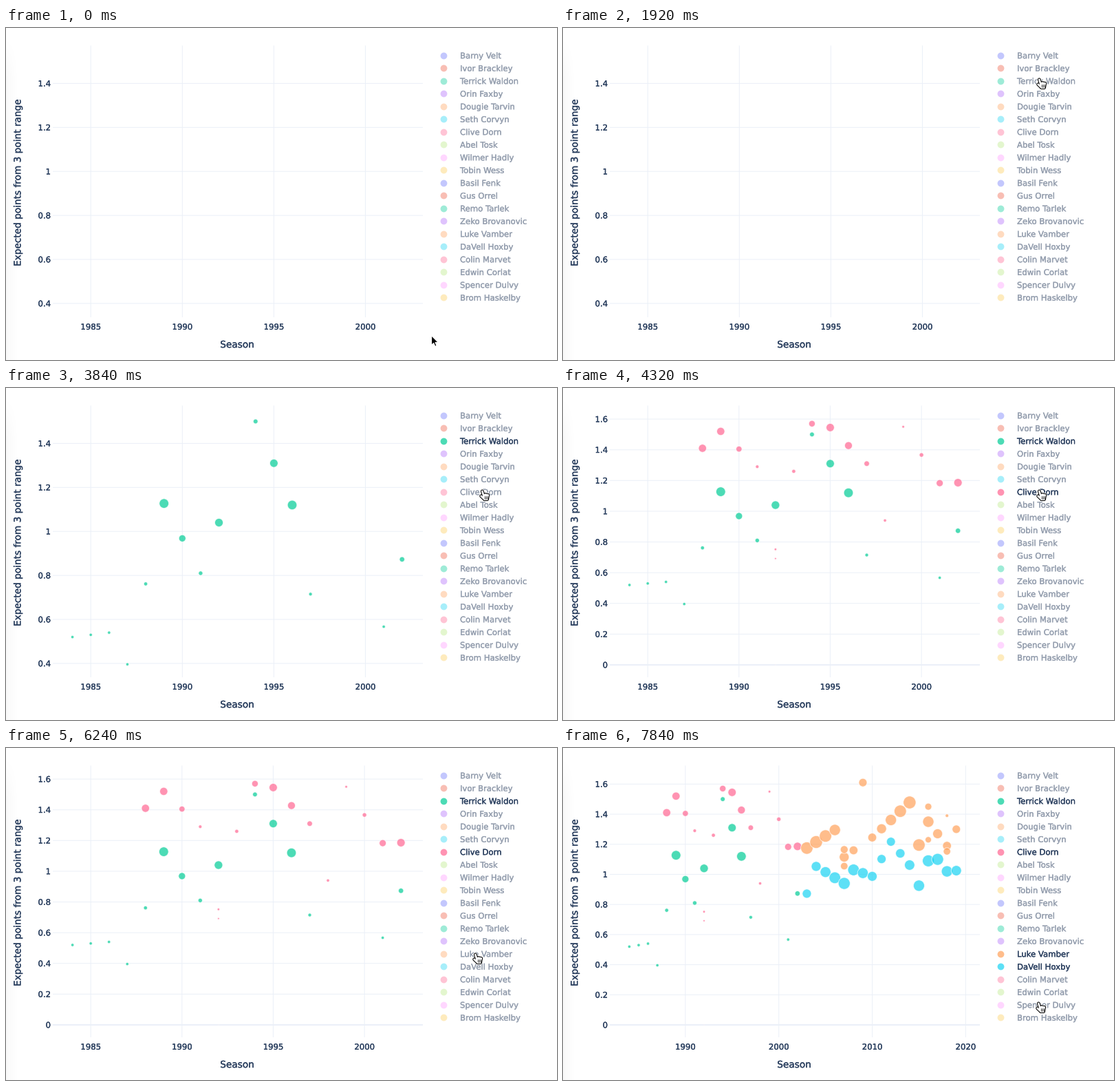
These frames come from a looping animation (801 px wide and 482 px high, 8 s). A matplotlib script:

```python
import math

import matplotlib.pyplot as plt
import numpy as np
from matplotlib.animation import FuncAnimation
from matplotlib.colors import to_rgba
from matplotlib.patches import Polygon
from matplotlib.patheffects import withStroke

W, H, DPI = 801, 482, 100
PT = 72 / DPI                      # points per pixel
FRAMES, STEP = 50, 160
INK, GRID = "#2a3f5f", "#ebf0f8"
LEFT, RIGHT, TOP, BOTTOM = 68, 606, 25.5, 420

plt.rcParams.update({"font.family": "DejaVu Sans", "text.hinting": "none",
                     "toolbar": "None"})

COLORS = ["#636efa", "#ef553b", "#00cc96", "#ab63fa", "#ffa15a",
          "#19d3f3", "#ff6692", "#b6e880", "#ff97ff", "#fecb52"]
PLAYERS = ["Barny Velt", "Ivor Brackley", "Terrick Waldon", "Orin Faxby",
           "Dougie Tarvin", "Seth Corvyn", "Clive Dorn", "Abel Tosk",
           "Wilmer Hadly", "Tobin Wess", "Basil Fenk", "Gus Orrel",
           "Remo Tarlek", "Zeko Brovanovic", "Luke Vamber", "DaVell Hoxby",
           "Colin Marvet", "Edwin Corlat", "Spencer Dulvy", "Brom Haskelby"]


def wave(mean, swing, peak, period):
    """Dot radius that rises and falls over the seasons."""
    return lambda year, _: mean + swing * np.cos(math.tau * (year - peak) / period)


def bump(base, gain, middle, spread):
    """Dot radius that is largest for values near the middle."""
    return lambda _, value: base + gain * np.exp(-((value - middle) / spread) ** 2)


class Series:
    """Seasons along a line through turning points; a season split between
    teams gets further, smaller dots at an offset from the line."""

    def __init__(self, row, shown, radius, turns, gaps=(), splits=()):
        self.row, self.shown = row, shown
        at, level = zip(*turns)
        years = np.array([y for y in range(at[0], at[-1] + 1) if y not in gaps])
        extra = np.array([y for y, _ in splits], int)
        shift = np.array([0] * len(years) + [d for _, d in splits])
        self.years = np.append(years, extra)
        line = np.interp(self.years, at, level)
        self.values = line + shift
        self.radii = radius(self.years, line) * np.exp(-5 * np.abs(shift))


SERIES = [
    Series(2, 2240, bump(2, 4.8, 1.17, .28),
           [(1984, .52), (1986, .54), (1987, .396), (1989, 1.127),
            (1991, .81), (1994, 1.5), (1996, 1.12), (1997, .715),
            (2001, .567), (2002, .873)],
           gaps=(1993, 1998, 1999, 2000)),
    Series(6, 4160, wave(3.7, 2.1, 1995.3, 6.8),
           [(1988, 1.41), (1989, 1.52), (1991, 1.29), (1992, .752),
            (1993, 1.26), (1994, 1.57), (1995, 1.545), (1997, 1.31),
            (1998, .94), (1999, 1.55), (2001, 1.183), (2002, 1.186)],
           splits=[(1992, -.06), (1992, -.752)]),
    Series(14, 6560, wave(7.4, 1.6, 2004, 10),
           [(2003, 1.175), (2006, 1.295), (2007, 1.115), (2008, 1.16),
            (2009, 1.61), (2010, 1.245), (2014, 1.478), (2015, 1.195),
            (2016, 1.35), (2018, 1.19), (2019, 1.3)],
           splits=[(2007, .05), (2007, -.06), (2016, .1), (2016, -.12),
                   (2018, .2), (2018, -.037)]),
    Series(15, 7200, wave(7.3, 1.1, 2007, 9.5),
           [(2003, .872), (2004, 1.053), (2007, .94), (2008, 1.03),
            (2010, .987), (2012, 1.217), (2014, 1.062), (2015, .925),
            (2016, 1.09), (2017, 1.1), (2018, 1.02), (2019, 1.025)]),
]

# axis limits per stage: years, values, year step
SHORT = (1982.926, 2003.137), (.337, 1.572), 5
VIEWS = [SHORT, SHORT,
         ((1982.92, 2003.2), (-.081, 1.688), 5),
         ((1981.9, 2021.37), (-.0824, 1.723), 5),
         ((1981.91, 2021.52), (-.0824, 1.723), 10)]

# pointer rests: arrive, leave (ms), x, y
RESTS = np.array([(0, 160, 618.5, 446.5), (1120, 1120, 714, 59),
                  (1760, 2400, 688, 72), (3360, 4680, 688, 147),
                  (5600, 5600, 684, 331), (6240, 6400, 678, 297),
                  (6880, 7200, 685, 317), (7840, 8000, 687, 368)])

fig = plt.figure(figsize=(W / DPI, H / DPI), dpi=DPI, facecolor="white")
ax = fig.add_axes([0, 0, 1, 1])
ax.axis("off")


def label(x, y, text, size=11.68, **kw):
    return ax.text(x, y, text, fontsize=size * PT, color=INK, va="baseline",
                   path_effects=[withStroke(linewidth=.3 * PT)], **kw)


def rule(xs, ys, width=1.0):
    return ax.plot(xs, ys, color=GRID, lw=width * PT, zorder=1, snap=False,
                   solid_capstyle="butt")[0]


def dots(xs, ys, radii, color, edge=1.0):
    sizes = (2 * np.asarray(radii) * PT) ** 2
    return ax.scatter(xs, ys, s=sizes, color=[to_rgba(color, .7)],
                      edgecolors=[(1, 1, 1, .7)], linewidths=edge * PT,
                      zorder=3, snap=False)


def multiples(limits, step):
    lo, hi = limits
    return [k * step for k in range(math.ceil(lo / step),
                                    math.floor(hi / step) + 1)]


def build_view(stage):
    years, values, step = VIEWS[stage]

    def to_x(year):
        return LEFT + (RIGHT - LEFT) * (year - years[0]) / (years[1] - years[0])

    def to_y(value):
        return BOTTOM + (TOP - BOTTOM) * (value - values[0]) / (values[1] - values[0])

    parts = []
    for year in multiples(years, step):
        x = to_x(year)
        parts += [rule((x, x), (TOP, BOTTOM)),
                  label(x, 437.8, f"{year}", ha="center")]
    for value in multiples(values, .2):
        y = to_y(value)
        parts += [rule((LEFT, RIGHT), (y, y), 1 if value else 2),
                  label(65, y + 4.3, f"{value:.2g}", ha="right")]
    for s in SERIES[:stage]:
        parts.append(dots(to_x(s.years), to_y(s.values), s.radii + .2,
                          COLORS[s.row % 10]))
    return parts


# soft shade along the left edge
shade = np.zeros((H, 22, 4))
fade_x = np.linspace(1, 0, 22) ** 1.5
fade_y = np.clip((np.arange(H) - 10) / 60, 0, 1)
shade[..., 3] = .028 * fade_y[:, None] * fade_x
ax.imshow(shade, extent=(0, 22, H, 0), aspect="auto", zorder=0)
ax.set(xlim=(0, W), ylim=(H, 0))

label(336, 464, "Season", 13.67, ha="center")
label(21.3, 225, "Expected points from 3 point range", 13.67, ha="center",
      rotation=90, rotation_mode="anchor")

legend = []
for i, name in enumerate(PLAYERS):
    y = 39.6 + 18.5 * i
    legend.append((dots([636.2], [y], [4.9], COLORS[i % 10], 0),
                   label(660, y + 4.6, name)))

views = [build_view(n) for n in range(len(VIEWS))]

# pointer shapes, relative to the pointer position
ARROW = np.array([(0, 0), (0, 14), (3.2, 11), (5.3, 15.8), (7.6, 14.8),
                  (5.6, 10.1), (9.8, 9.9)])
arrow = ax.add_patch(Polygon(ARROW, fc="black", ec="white", lw=1.2 * PT,
                             joinstyle="round", zorder=8))


def strokes(segments):
    """Separate strokes as one broken line."""
    gap = (np.nan, np.nan)
    return np.array([p for a, b in segments for p in (a, b, gap)])


FINGERS = strokes([((4.3, 2.8), (7.4, 13)), ((2.6, 9.8), (7, 14))]
                  + [((8.6 + 2.1 * j, 7.5 + .4 * j), (7.8 + 1.9 * j, 14.7))
                     for j in range(3)])
CREASES = strokes([((8 + 2 * j, 10.2), (8 + 2 * j, 13.6)) for j in range(3)])
hand = [(shape, ax.plot([], [], color=color, lw=width * PT, zorder=z,
                        solid_capstyle="round")[0])
        for shape, color, width, z in [(FINGERS, "white", 6, 7),
                                       (FINGERS, "black", 4.8, 8),
                                       (FINGERS, "white", 2.7, 9),
                                       (CREASES, "black", .8, 10)]]


def pointer(ms):
    """Ease from one rest to the next."""
    pos = np.interp(ms, RESTS[:, :2].ravel(), np.repeat(range(len(RESTS)), 2))
    k = min(int(pos), len(RESTS) - 2)
    u = pos - k
    a, b = RESTS[k:k + 2, 2:]
    return a + (b - a) * u * u * (3 - 2 * u)


def update(frame):
    ms = frame * STEP
    active = [s.row for s in SERIES if ms >= s.shown]
    for n, parts in enumerate(views):
        for part in parts:
            part.set_visible(n == len(active))

    for i, (dot, text) in enumerate(legend):
        dot.set_alpha(.7 if i in active else .38)
        text.set_color(INK if i in active else "#959faf")

    tip = pointer(ms)
    over = tip[0] > 630
    arrow.set_xy(ARROW + tip)
    arrow.set_visible(not over)
    for shape, line in hand:
        line.set_data(*(shape + tip).T)
        line.set_visible(over)
    return []


anim = FuncAnimation(fig, update, frames=FRAMES, interval=STEP,
                     init_func=lambda: update(0), repeat=True, repeat_delay=0)
plt.show()
```
